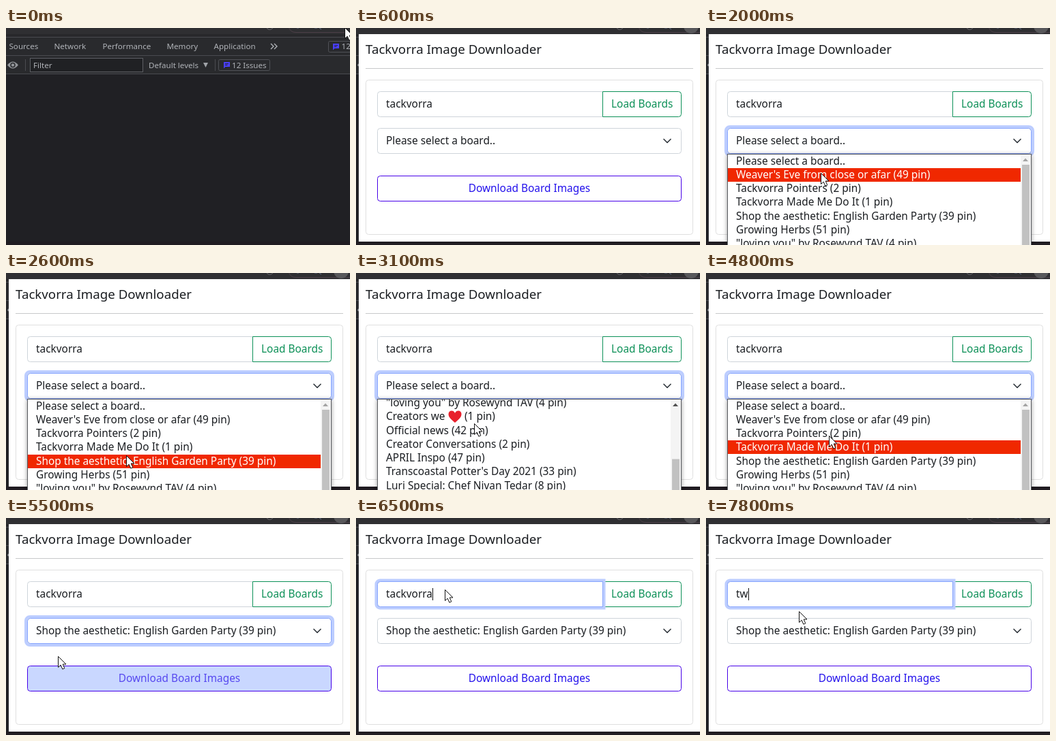
Recreate the animation shown at these times as an HTML page. Size 504x319 px, loop 8 s.

```html
<!DOCTYPE html>
<html lang="en">
<head>
<meta charset="utf-8">
<title>Image Downloader</title>
<style>
  html, body { margin: 0; width: 100%; height: 100%; overflow: hidden; background: #202124; }
  svg { display: block; width: 504px; height: 319px; }
  text { font: 15.4px "Noto Sans", "Open Sans", sans-serif; fill: #1a1d21; white-space: pre; }
  .tools text { font-size: 11.6px; fill: #b0b3b8; }
  .title { font-size: 18.7px; font-weight: 500; }
  .field { fill: #fff; stroke: #ced4da; }
  .ring { fill: none; stroke: #bccdff; stroke-width: 4; }
  .edge { fill: none; stroke: #86a4fe; }
  .line { stroke: #4a4b50; }
  .box { fill: none; stroke: #505257; }
  #list { filter: drop-shadow(0 1px 3px #0006); }
  #hover rect, #hover text { fill: #fff; }
</style>
</head>
<body>
<svg viewBox="0 0 504 319">
  <defs>
    <clipPath id="listClip"><rect x="32" y="186" width="444" height="133"/></clipPath>
    <g id="note"><path d="M0 0h9v7H2.500L0 9.500z" fill="#4a3fff"/><path d="M2 2.500h5M2 4.500h3.500" stroke="#24242a"/></g>
    <path id="inputEdge" d="M361.500 93.500H35.500a4 4 0 0 0-4 4V126.500a4 4 0 0 0 4 4H361.500z"/>
    <rect id="selectEdge" x="31.500" y="147.500" width="445" height="37" rx="4"/>
  </defs>

  <g class="tools">
    <rect width="504" height="319" fill="#202024"/>
    <rect width="504" height="9" fill="#2f2f32"/>
    <rect y="9" width="504" height="4" fill="#28282b"/>
    <path d="M382 0q4 5 9 0" fill="none" stroke="#68686c"/>
    <path d="M414 -2Q416 6.500 425 6.500H504" fill="none" stroke="#4d4049"/>
    <path d="M426 0h3M452 0h4M459 0l3 2" stroke="#65708a"/>
    <circle id="press" cx="491" cy="-3" r="11" fill="#58585b"/>
    <rect y="13" width="504" height="55" fill="#292a2d"/>
    <path class="line" d="M0 13.500H504M0 40.500H504M0 67.500H504M28.500 46V63M306.500 46V63"/>
    <text x="4.500" y="31">Sources</text>
    <text x="70.500" y="31">Network</text>
    <text x="141.500" y="31">Performance</text>
    <text x="235.500" y="31">Memory</text>
    <text x="304.500" y="31">Application</text>
    <path d="M388 23l4 4-4 4M393 23l4 4-4 4" fill="none" stroke="#b0b3b8" stroke-width="1.400"/>
    <rect class="box" x="472.500" y="19.500" width="60" height="16" rx="2"/>
    <use href="#note" x="479" y="23"/>
    <text x="491.500" y="31">12</text>
    <path d="M2 54.500Q10 44.500 18 54.500Q10 64.500 2 54.500z" fill="#929599"/>
    <circle cx="10" cy="54.500" r="3" fill="#929599" stroke="#292a2d" stroke-width="1.500"/>
    <rect x="35.500" y="44.500" width="165" height="20" fill="#202124" stroke="#5d5f64"/>
    <text x="40" y="59">Filter</text>
    <text x="209" y="59">Default levels</text>
    <path d="M289 51h7l-3.500 7z" fill="#a0a3a8"/>
    <rect class="box" x="311.500" y="46.500" width="75" height="16" rx="2"/>
    <use href="#note" x="319" y="50"/>
    <text x="331" y="59">12 Issues</text>
    <rect y="314" width="504" height="5" fill="#201c22"/>
  </g>

  <g id="panel">
    <rect x="4" y="9" width="500" height="305" fill="#fff"/>
    <text class="title" x="14" y="38">Tackvorra Image Downloader</text>
    <path d="M14 59.500H494" stroke="#c8c9ca"/>
    <rect x="14.500" y="76.500" width="479" height="227" rx="4" fill="#fff" stroke="#dfdfdf"/>

    <use class="field" href="#inputEdge"/>
    <path d="M361.500 93.500H472.500a4 4 0 0 1 4 4V126.500a4 4 0 0 1-4 4H361.500z" fill="#fff" stroke="#0c9057"/>
    <text x="374" y="117" style="fill:#0c9057">Load Boards</text>
    <g id="inputFocus">
      <path class="ring" d="M363.500 91.500H35a6 6 0 0 0-5.500 6V127a6 6 0 0 0 5.500 5.500H363.500z"/>
      <use class="edge" href="#inputEdge"/>
    </g>
    <rect id="selection" x="44" y="103" width="68" height="19" fill="#f02800"/>
    <text id="typed" x="44" y="117"></text>
    <path id="caret" stroke="#111"/>

    <use class="field" href="#selectEdge"/>
    <g id="selectFocus">
      <rect class="ring" x="29" y="145" width="450" height="42" rx="6"/>
      <use class="edge" href="#selectEdge"/>
    </g>
    <text id="chosen" x="44" y="171"></text>
    <path d="M451 163.500l5 5 5-5" fill="none" stroke="#343a40" stroke-width="1.700" stroke-linecap="round" stroke-linejoin="round"/>

    <rect x="31.500" y="217.500" width="445" height="37" rx="4" fill="#fff" stroke="#4600e8"/>
    <text x="254" y="241" text-anchor="middle" style="fill:#2412ec">Download Board Images</text>
    <g id="buttonHover">
      <rect x="32" y="218" width="444" height="36" rx="3.500" fill="#1a55ff"/>
      <text x="254" y="241" text-anchor="middle" style="fill:#fff">Download Board Images</text>
    </g>
  </g>

  <g id="list">
    <rect x="31" y="185" width="446" height="140" fill="#55585d"/>
    <g clip-path="url(#listClip)">
      <rect x="32" y="186" width="444" height="133" fill="#fff"/>
      <g id="rows"><rect id="mark" x="32" width="429" height="20" fill="#f02800"/></g>
      <rect x="461" y="186" width="15" height="133" fill="#f4f4f4"/>
      <rect id="thumb" x="463" width="11" height="240" fill="#c1c1c1"/>
      <rect x="461" y="186" width="15" height="14" fill="#f4f4f4"/>
      <path id="arrow" d="M464 196h8l-4-4.500z"/>
    </g>
  </g>

  <path id="cursor" d="M.5.500V16.500L4.200 13.200 6.800 19.200 9.800 17.900 7.200 12H12z" fill="#fff" stroke="#111" stroke-linejoin="round"/>
</svg>
<script>
const LOOP = 8000, STEP = 100, PITCH = 20.25, TOP = 185.5, DEPTH = 232;
const $ = id => document.getElementById(id);

const boards = [
  "Please select a board..",
  "Weaver's Eve from close or afar (49 pin)",
  "Tackvorra Pointers (2 pin)",
  "Tackvorra Made Me Do It (1 pin)",
  "Shop the aesthetic: English Garden Party (39 pin)",
  "Growing Herbs (51 pin)",
  "\"loving you\" by Rosewynd TAV (4 pin)",
  "Creators we",
  "Official news (42 pin)",
  "Creator Conversations (2 pin)",
  "APRIL Inspo (47 pin)",
  "Transcoastal Potter's Day 2021 (33 pin)",
  "Luri Special: Chef Nivan Tedar (8 pin)",
  "Port Elm Garment Gala Fall - Winter \u201821 (33 pin)",
  "Ways to Support the Asian American Community (30 pin)",
  "Stay safe. Stay inspired. (1211 pin)",
  "Kind Hands Gather (155 pin)",
  "Black creators who inspire us (138 pin)"
];

// Cursor stops: time, x, y
const stops = [
  [700, 296, -25], [1400, 153, 163], [1600, 153, 163], [2000, 168, 213],
  [2400, 168, 214], [2600, 176, 268], [2900, 173, 221], [4700, 173, 220],
  [5000, 194, 277], [5200, 192, 279], [5500, 76, 203], [6100, 129, 105],
  [6700, 130, 105], [6900, 136, 137]
];

const ramp = (t, from, to) => Math.min(1, Math.max(0, (t - from) / (to - from)));
const smooth = p => p * p * (3 - 2 * p);
const easeOut = p => 1 - (1 - p) ** 2;
const set = (id, name, value) => $(id).setAttribute(name, value);
const show = (id, on) => { $(id).style.display = on ? "" : "none"; };

function make(tag, attrs, text = "") {
  const el = document.createElementNS("http://www.w3.org/2000/svg", tag);
  for (const k in attrs) el.setAttribute(k, attrs[k]);
  el.textContent = text;
  return $("rows").appendChild(el);
}

const rowTop = i => Math.round(TOP + PITCH * i);
const labels = boards.map((name, i) => make("text", { x: 44, y: rowTop(i) + 14.5 }, name));
make("text", { x: 159, y: rowTop(7) + 14.5 }, "(1 pin)");
make("path", {
  d: "M0 17C-6 12-9.500 9-9.500 4.500C-9.500-1.500-2-2 0 3C2-2 9.500-1.500 9.500 4.500C9.500 9 6 12 0 17z",
  transform: `translate(145 ${rowTop(7) + 2})`, fill: "#e8202c"
});

function cursorAt(t) {
  if (t < 400) return [496, -1];
  const i = stops.findIndex(s => s[0] > t);
  if (i < 1) return stops.at(i).slice(1);
  const a = stops[i - 1], b = stops[i], p = ramp(t, a[0], b[0]);
  return [1, 2].map(n => Math.round(a[n] + (b[n] - a[n]) * p));
}

const scrollAt = t => DEPTH * (easeOut(ramp(t, 2800, 3730)) - smooth(ramp(t, 4100, 4800)));

// The highlight trails the scrolling by one step.
function rowAt(t, y) {
  if (t >= 2900 && t < 4200) return -1;
  return Math.max(0, Math.floor((y + scrollAt(t - STEP) - TOP) / PITCH));
}

function draw(t) {
  const [x, y] = cursorAt(t);
  set("cursor", "transform", `translate(${x} ${y})`);
  show("cursor", t < 400 || t >= 800);
  show("press", t >= 100);
  set("panel", "opacity", easeOut(ramp(t, 300, 600)));

  const moved = ramp(t, 6300, 6500);
  set("selectFocus", "opacity", ramp(t, 1500, 1700) - moved);
  set("inputFocus", "opacity", moved);
  set("buttonHover", "opacity", Math.max(0, 1 - Math.abs(t - 5400) / 130));

  const scroll = Math.round(scrollAt(t)), row = rowAt(t, y);
  show("list", t >= 1700 && t < 5300);
  set("rows", "transform", `translate(0 ${-scroll})`);
  set("thumb", "y", 201 + scroll * .576);
  set("arrow", "fill", scroll ? "#505050" : "#a3a3a3");
  set("mark", "y", rowTop(row));
  show("mark", row >= 0);
  labels.forEach((el, i) => { el.style.fill = i === row ? "#fff" : ""; });
  $("chosen").textContent = boards[t < 5300 ? 0 : 4];

  const marked = t >= 6700 && t < 7700;
  $("typed").textContent = t < 7700 ? "tackvorra" : "tw".slice(0, (t - 7600) / STEP);
  $("typed").style.fill = marked ? "#fff" : "";
  show("selection", marked);
  show("caret", t >= 6400 && !marked);
  const end = Math.round(44 + $("typed").getComputedTextLength()) + .5;
  set("caret", "d", `M${end} 103V121`);
}

const start = performance.now();
function tick() {
  const t = (performance.now() - start) % LOOP;
  draw(Math.floor(t / STEP) * STEP);
  requestAnimationFrame(tick);
}
tick();
</script>
</body>
</html>
```
